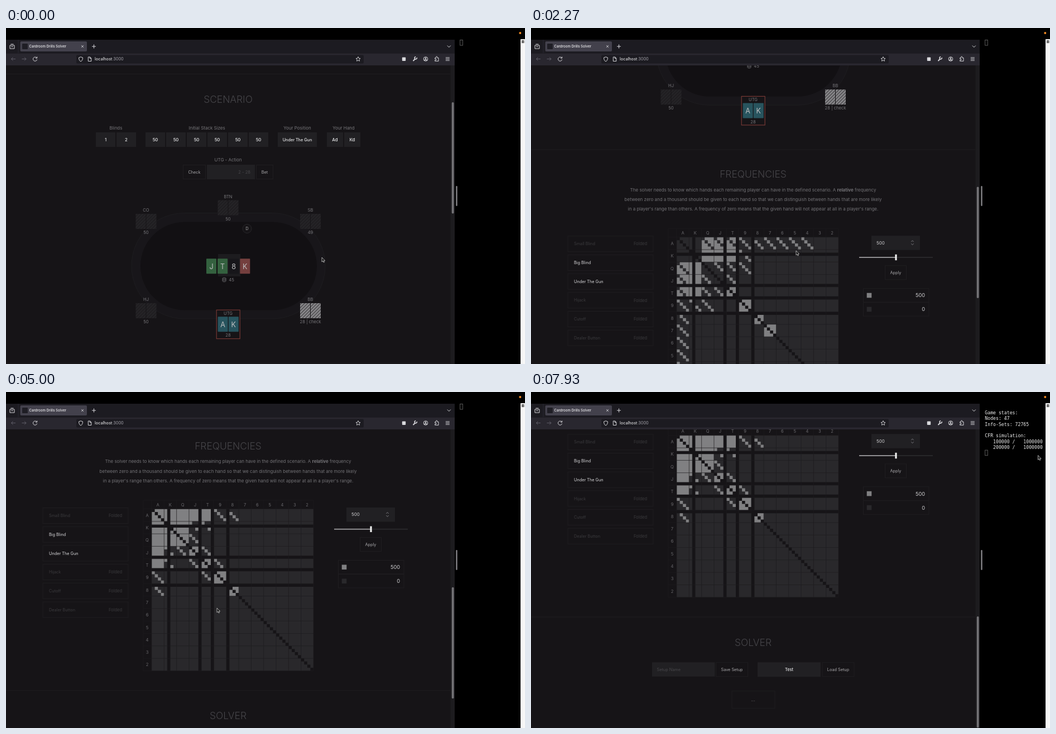
An HTML page that plays this animation: 930x602 px, repeating every 8000 ms.

```html
<!DOCTYPE html>
<html lang="en">
<head>
<meta charset="utf-8">
<title>Cardroom Drills Solver</title>
<style>
  html, body { margin: 0; width: 100%; height: 100%; overflow: hidden; background: #000; }
  svg { display: block; width: 930px; height: 602px; font-family: Inter, "Noto Sans", sans-serif; }
  #terminal { font-family: "DejaVu Sans Mono", "Liberation Mono", monospace; white-space: pre; }
</style>
</head>
<body>
<svg id="stage" viewBox="0 0 930 602" xmlns="http://www.w3.org/2000/svg"></svg>
<script>
const LOOP = 8000, FPS = 15;
const PAGE = '#161417', FIELD = '#212023', EDGE = '#1f1d20', CELL = '#29282b', LIT = '#808082';
const LABEL = '#77767a', BUTTON = '#a9a8ab', DIM = '#3b3a3d', WHITE = '#e8e8ea';
const GREEN = '#34613f', RED = '#743f3e', TEAL = '#28545e';

// Drawing helpers. Text is placed by its vertical centre.
const rect = (x, y, w, h, fill, more = '') =>
  `<rect x="${x}" y="${y}" width="${w}" height="${h}" fill="${fill}" ${more}/>`;
const frame = (x, y, w, h, stroke = EDGE, more = '') =>
  rect(x, y, w, h, 'none', `stroke="${stroke}" ${more}`);
const text = (s, x, y, size, fill, anchor = 'middle', more = '') =>
  `<text x="${x}" y="${(y + size * 0.36).toFixed(2)}" font-size="${size}" fill="${fill}" text-anchor="${anchor}" ${more}>${s}</text>`;
const stroke = (d, color = '#d8d8dc', width = 1, more = '') =>
  `<path d="${d}" fill="none" stroke="${color}" stroke-width="${width}" ${more}/>`;
const heading = (s, y) => text(s, 398, y, 17.4, '#464549', 'middle', 'font-weight="300"');
const field = (s, x, y, w, size = 7.8) =>
  rect(x, y, w, 26, FIELD) + text(s, x + w / 2, y + 13, size, WHITE, 'middle', 'font-weight="500"');
const button = (s, x, y, w, h = 25) =>
  frame(x, y, w, h) + text(s, x + w / 2, y + h / 2, 7.3, BUTTON);

function scenario() {
  let out = stroke('M0 82.5H796', EDGE) + heading('SCENARIO', 127.5);
  [['Blinds', 197], ['Initial Stack Sizes', 360], ['Your Position', 522], ['Your Hand', 605]]
    .forEach(([s, x]) => out += text(s, x, 179, 7.95, LABEL));
  out += field('1', 161, 187, 35) + field('2', 198, 187, 35);
  for (let i = 0; i < 6; i++) out += field('50', 250 + 37 * i, 187, 35);
  out += field('Under The Gun', 487, 187, 70, 7.25) + field('Ad', 575, 187, 29) + field('Kd', 606, 187, 29);
  out += text('UTG - Action', 398, 236.5, 7.95, LABEL) + button('Check', 317.5, 245.5, 40);
  out += rect(360, 245, 86, 26, FIELD) + text('2 - 28', 438, 258, 7.6, '#49484c', 'end');
  return out + button('Bet', 448.5, 245.5, 30);
}

function seat(name, x, y, stack, pattern) {
  const cards = [-18.5, 0.5].map(dx => rect(x + dx, y + 6.5, 18, 27, `url(#${pattern})`)).join('');
  return text(name, x, y, 7.6, LABEL) + cards + text(stack, x, y + 40, 7.6, LABEL);
}

const card = (rank, x, y, fill) =>
  rect(x, y, 18, 27, fill, 'rx=".8"') + text(rank, x + 9, y + 13.8, 12.5, '#bfbfc1');

function table() {
  let out = rect(225, 331.5, 347, 189.5, '#18161a', `rx="95" stroke="#1e1d20"`);
  out += rect(241, 347.5, 316, 158, '#121013', 'rx="79"');
  out += rect(380, 405, 40, 40, '#1d1c1f');
  out += seat('BTN', 398, 302, 50, 'folded') + seat('CO', 251, 326.5, 50, 'folded');
  out += seat('SB', 545.5, 326.5, 49, 'folded') + seat('HJ', 251, 486.5, 50, 'folded');
  out += seat('BB', 545.5, 486.5, '28 | check', 'active');
  out += `<circle cx="432" cy="359.5" r="8" fill="${PAGE}" stroke="#28272a"/>` + text('D', 432, 359.5, 7.5, '#a0a0a2');
  [['J', GREEN], ['T', GREEN], ['8', '#17161a'], ['K', RED]]
    .forEach(([r, c], i) => out += card(r, 359 + 20.1 * i, 413.3, c));
  out += stroke('M388 448.6V453.4A3 1.3 0 0 0 394 453.4V448.6A3 1.3 0 0 0 388 448.6A3 1.3 0 0 0 394 448.6M388 451A3 1.3 0 0 0 394 451', LABEL, .8);
  out += text('45', 404, 451, 7.8, LABEL);
  out += rect(377.2, 505.2, 42, 51.5, PAGE, 'stroke="#7e3b37" stroke-width="1.1"');
  return out + text('UTG', 398, 511, 7.6, LABEL) + card('A', 379.6, 517.3, TEAL) +
    card('K', 398.8, 517.3, TEAL) + text('28', 398, 550.6, 7.6, LABEL);
}

// 52 x 52 grid of two-card hands; suits run s, h, d, c within each rank.
const RANKS = 'AKQJT98765432';
const GX = 261, GY = 757.5, STEP = 290 / 52;
const BOARD = [5, 15, 19, 24];
const RANGES = [
  'AQo AJo ATo A9s A8s A7s A6s A5s A4s KQ KJ KT K9s QJs QTs Q9s JTs TT 99 88 77',
  'AA KK QQ JJ TT 99 88 AK AQ AJ AT A9s A8s KQ KJs KTs QJs JTs T9s'
].map(s => s.split(' '));

function gridPath(test) {
  let d = '';
  for (let r = 0; r < 52; r++) for (let c = 0; c < 52; c++) {
    if (BOARD.includes(r) || BOARD.includes(c) || !test(r, c)) continue;
    d += `M${(GX + c * STEP).toFixed(1)} ${(GY + r * STEP).toFixed(1)}h5.6v5.6h-5.6z`;
  }
  return d;
}

function inRange(range, r, c) {
  const lo = Math.min(r, c), hi = Math.max(r, c);
  const hand = RANKS[lo >> 2] + RANKS[hi >> 2];
  return r !== c && (range.includes(hand) || range.includes(hand + (lo % 4 === hi % 4 ? 's' : 'o')));
}

function matrix() {
  let out = `<path d="${gridPath((r, c) => r !== c)}" fill="${CELL}"/>`;
  RANGES.forEach((range, i) =>
    out += `<path id="range${i}" d="${gridPath((r, c) => inRange(range, r, c))}" fill="${LIT}"/>`);
  let lines = `M246 742V${GY + 290}M246 742H551`;
  for (let i = 0; i <= 13; i++) {
    const p = i * STEP * 4;
    lines += `M${GX + p} 742V${GY + 290}M246 ${GY + p}H551`;
    if (i < 13) out += text(RANKS[i], 272 + p, 750, 7.6, '#68676b') + text(RANKS[i], 253, 769 + p, 7.6, '#68676b');
  }
  return out + stroke(lines, '#1d1c1f', .7);
}

const PLAYERS = ['Small Blind', 'Big Blind', 'Under The Gun', 'Hijack', 'Cutoff', 'Dealer Button'];
const rowY = i => 755.5 + 33.7 * i;

function frequencies() {
  let out = stroke('M0 600.8H796', EDGE) + heading('FREQUENCIES', 645);
  ['The solver needs to know which hands each remaining player can have in the defined scenario. A <tspan font-weight="700">relative</tspan> frequency',
   'between zero and a thousand should be given to each hand so that we can distinguish between hands that are more likely',
   "in a player's range than others. A frequency of zero means that the given hand will not appear at all in a player's range."]
    .forEach((s, i) => out += text(s, 398, 672.5 + 17.4 * i, 8, '#737276'));
  PLAYERS.forEach((name, i) => {
    const active = i === 1 || i === 2, y = rowY(i);
    out += rect(66, y, 153, 28, PAGE, `id="row${i}" stroke="${EDGE}"`);
    out += text(name, 77, y + 14, 7.3, active ? '#d6d6d8' : DIM, 'start');
    if (!active) out += text('Folded', 208, y + 14, 7.5, DIM, 'end');
  });
  out += matrix();
  out += rect(610, 755, 87, 25.5, FIELD) + text('500', 619, 767.5, 7.9, '#cfcfd1', 'start');
  out += stroke('M681.3 766L683.5 763.5 685.7 766M681.3 769L683.5 771.5 685.7 769', '#77767c');
  out += rect(588, 792.8, 66, 1.9, '#969598') + rect(654, 792.8, 66, 1.9, CELL) + rect(652.4, 788.5, 3.2, 10.5, '#eee');
  out += button('Apply', 634.5, 808.5, 38);
  [['500', LIT], ['0', CELL]].forEach(([s, c], i) => {
    const y = 849.5 + 25 * i;
    out += frame(595.5, y, 117.5, 24.5) + rect(601.7, y + 8, 8.6, 8.6, c) + text(s, 706, y + 12.4, 9.2, '#d0d0d2', 'end');
  });
  return out;
}

function solver() {
  return stroke('M0 1082.8H796', EDGE) + heading('SOLVER', 1128) +
    rect(217, 1164, 112.5, 25.5, FIELD) + text('Setup Name', 225.5, 1176.7, 7.3, '#48474b', 'start') +
    button('Save Setup', 331.5, 1164.5, 57) + field('Test', 406, 1164, 113, 7.4) + button('Load Setup', 522, 1164.5, 57) +
    rect(360, 1215.5, 77, 31, PAGE, `id="run" stroke="${EDGE}"`) +
    text('Run Solver', 398, 1231, 8.3, BUTTON, 'middle', 'id="runText"');
}

function chrome() {
  const soft = '#d8d8dc', dim = '#5d5c66';
  let out = rect(0, 21, 804, 24.5, '#1c1b21') + rect(0, 45.5, 804, 21.5, '#29272f');
  out += rect(25.5, 24, 119.5, 18, '#43414c', 'rx="2"') + rect(29, 28, 10, 10, '#1f1e25', 'rx="1"');
  out += text('Cardroom Drills Solver', 41.5, 33, 6.2, '#f0f0f2', 'start', 'font-weight="500"');
  out += stroke('M22 21V45', '#35343d', .6);
  out += stroke('M7 31H15V37H7ZM8.5 29H13.5M9.5 33.5H12.5') + stroke('M135 31L139 35M139 31L135 35', soft, .8);
  out += stroke('M154 33H161M157.5 29.5V36.5M790.8 31.5L793.8 34.5 796.8 31.5');
  out += stroke('M17 55.5H9.5M12.5 52.5L9.5 55.5 12.5 58.5M28.5 55.5H36M33 52.5L36 55.5 33 58.5', dim);
  out += stroke('M55 53.5A3.6 3.6 0 1 0 55.6 56.5M55.7 51.5V54H53');
  out += rect(126, 48.5, 515, 15, '#1c1b21', 'rx="2"');
  out += stroke('M134 51.8L137.4 53C137.4 56.5 136.8 58.5 134 60 131.2 58.5 130.6 56.5 130.6 53Z');
  out += stroke('M147.3 52H150.7L152.8 54.2V59.5H147.3ZM150.3 52V54.6H152.6');
  out += text(`localhost<tspan fill="#a5a4ac">:3000</tspan>`, 159, 55.8, 7.3, '#f2f2f4', 'start');
  out += stroke('M631 51.5L632.2 54.2 635 54.5 632.9 56.4 633.5 59.3 631 57.8 628.5 59.3 629.1 56.4 627 54.5 629.8 54.2Z', soft, .9);
  out += rect(709.8, 52.5, 6.4, 6.4, soft, 'rx="1"');
  out += stroke('M729.5 59L733.5 55', soft, 1.8) + stroke('M736.2 53A2.1 2.1 0 1 1 734.2 51.6', soft, 1.6);
  out += `<circle cx="752" cy="55.5" r="3.8" fill="none" stroke="${soft}"/><circle cx="752" cy="54.3" r="1.3" fill="${soft}"/>`;
  out += stroke('M749.5 58Q752 55.5 754.5 58', soft, 1.2);
  out += stroke('M768.7 53.5H770.5V52.2A1.2 1.2 0 0 1 772.9 52.2V53.5H775V59.3H768.7V57.5H770A1 1 0 0 0 770 55.4H768.7Z');
  return out + stroke('M787.8 53H794.8M787.8 55.6H794.8M787.8 58.2H794.8');
}

const stripes = (id, ground, line) =>
  `<pattern id="${id}" width="4" height="4" patternUnits="userSpaceOnUse" patternTransform="rotate(45)">
  ${rect(0, 0, 4, 4, ground)}${rect(0, 0, 2.4, 4, line)}</pattern>`;

document.getElementById('stage').innerHTML =
  `<defs>${stripes('folded', '#1d1b1e', '#252427')}${stripes('active', '#4a494c', '#8d8c8f')}
  <clipPath id="view">${rect(0, 67, 804, 535, '#000')}</clipPath></defs>` +
  rect(0, 0, 930, 602, '#000') + rect(0, 21, 804, 581, PAGE) +
  `<g clip-path="url(#view)"><g id="page">${scenario()}${table()}${frequencies()}${solver()}</g></g>` +
  rect(796.5, 67, 7.5, 535, '#1d1c1f') + rect(798.8, 133, 3.7, 199.5, '#747376', 'rx="1.8" id="thumb"') + chrome() +
  rect(806.3, 283, 2.4, 36, '#848387', 'rx="1.2"') + '<circle cx="921.3" cy="9" r="2" fill="#f08a24"/>' +
  rect(922, 20, 8, 582, '#f7f7f7') + rect(924, 22, 4.5, 5, '#555') + stroke('M924.5 23.6H928M924.5 25.4H928', '#ccc', .5) +
  '<g id="terminal"></g>' + frame(813.7, 0, 4.6, 9.6, '#6d6d6d', 'stroke-width=".8" id="caret"') +
  `<g id="cursor"><path id="arrow" d="M0 0V8L1.9 6.3 3.1 9 4.4 8.4 3.2 5.9H5.6Z" fill="#111" stroke="#e4e4e4" stroke-width=".7"/>
  <path id="hand" d="M-.9 .8Q0-.4 .9 .8V3.4L3.8 4.2Q4.5 4.6 4.3 5.6L3.5 9H-.6L-3 5.6Q-2.6 4.4-.9 5.6Z" fill="#eee" stroke="#222" stroke-width=".6"/></g>`;

const $ = id => document.getElementById(id);
const show = (id, on) => $(id).setAttribute('display', on ? 'inline' : 'none');

// Keyframes: time followed by values, eased between neighbours.
const SCROLL = [[0, 0], [650, 0], [900, 25], [1350, 150], [1733, 258], [1800, 259.7], [2000, 270], [2140, 305],
  [2267, 383], [2400, 548], [5250, 548], [5530, 679.7], [8000, 679.7]];
const POINTER = [[0, 566, 411], [67, 566, 411], [870, 490, 402], [1733, 473.5, 400], [2267, 475, 399], [2560, 475, 399],
  [3400, 123, 262], [3533, 121, 247], [3690, 121, 247], [4130, 112, 293], [4640, 112, 293], [5000, 378, 387],
  [5250, 379, 388], [5530, 384, 385], [6040, 384, 385], [6500, 397, 552], [7230, 397, 552], [7900, 908.5, 113.5], [8000, 908.5, 113.5]];
const CLICK_RANGE = 4330, CLICK_RUN = 6800;
const OUTPUT = [[6870, ''], [6870, 'Game states:'], [6870, 'Nodes: 47'], [6870, 'Info-Sets: 72765'], [6870, ''],
  [6870, 'CFR simulation:'], [7400, '   100000 /   1000000'], [7900, '   200000 /   1000000']];

function at(keys, t, k) {
  const i = Math.max(1, keys.findIndex(key => key[0] >= t));
  const a = keys[i - 1], b = keys[i];
  const u = (t - a[0]) / (b[0] - a[0]);
  const e = keys === SCROLL ? u : u * u * (3 - 2 * u);
  return a[k] + (b[k] - a[k]) * e;
}

let printed = -1;
function draw(t) {
  const scroll = at(SCROLL, t, 1), x = at(POINTER, t, 1), y = at(POINTER, t, 2);
  $('page').setAttribute('transform', `translate(0 ${-scroll})`);
  $('thumb').setAttribute('y', 133 + scroll * 0.3956);

  const over = (left, top, w, h) => x > left && x < left + w && y + scroll > top && y + scroll < top + h;
  let hot = false;
  const hover = (id, on) => { hot = hot || on; $(id).setAttribute('fill', on ? '#252427' : PAGE); };
  [1, 2].forEach(i => hover('row' + i, over(66, rowY(i), 153, 28)));
  hover('run', over(360, 1215, 77, 31) && t < CLICK_RUN);

  $('cursor').setAttribute('transform', `translate(${x} ${y})`);
  show('hand', hot);
  show('arrow', !hot);
  show('range0', t < CLICK_RANGE);
  show('range1', t >= CLICK_RANGE);
  $('runText').textContent = t < CLICK_RUN ? 'Run Solver' : '...';
  $('runText').setAttribute('fill', t < CLICK_RUN ? BUTTON : '#68676b');

  const lines = OUTPUT.filter(([start]) => t >= start);
  if (lines.length !== printed) {
    printed = lines.length;
    $('terminal').innerHTML = lines.map(([, s], i) =>
      text(s, 813.3, 26.6 + 10.33 * i, 8.2, '#eee', 'start', 'xml:space="preserve"')).join('');
    $('caret').setAttribute('y', 21.5 + 10.33 * printed);
  }
}

const hold = t => Math.floor((t + 5) * FPS / 1000) * 1000 / FPS;

const begin = performance.now();
function tick() {
  const t = (performance.now() - begin) % LOOP;
  draw(Math.min(hold(t), LOOP - 1));
  requestAnimationFrame(tick);
}
tick();
</script>
</body>
</html>
```
